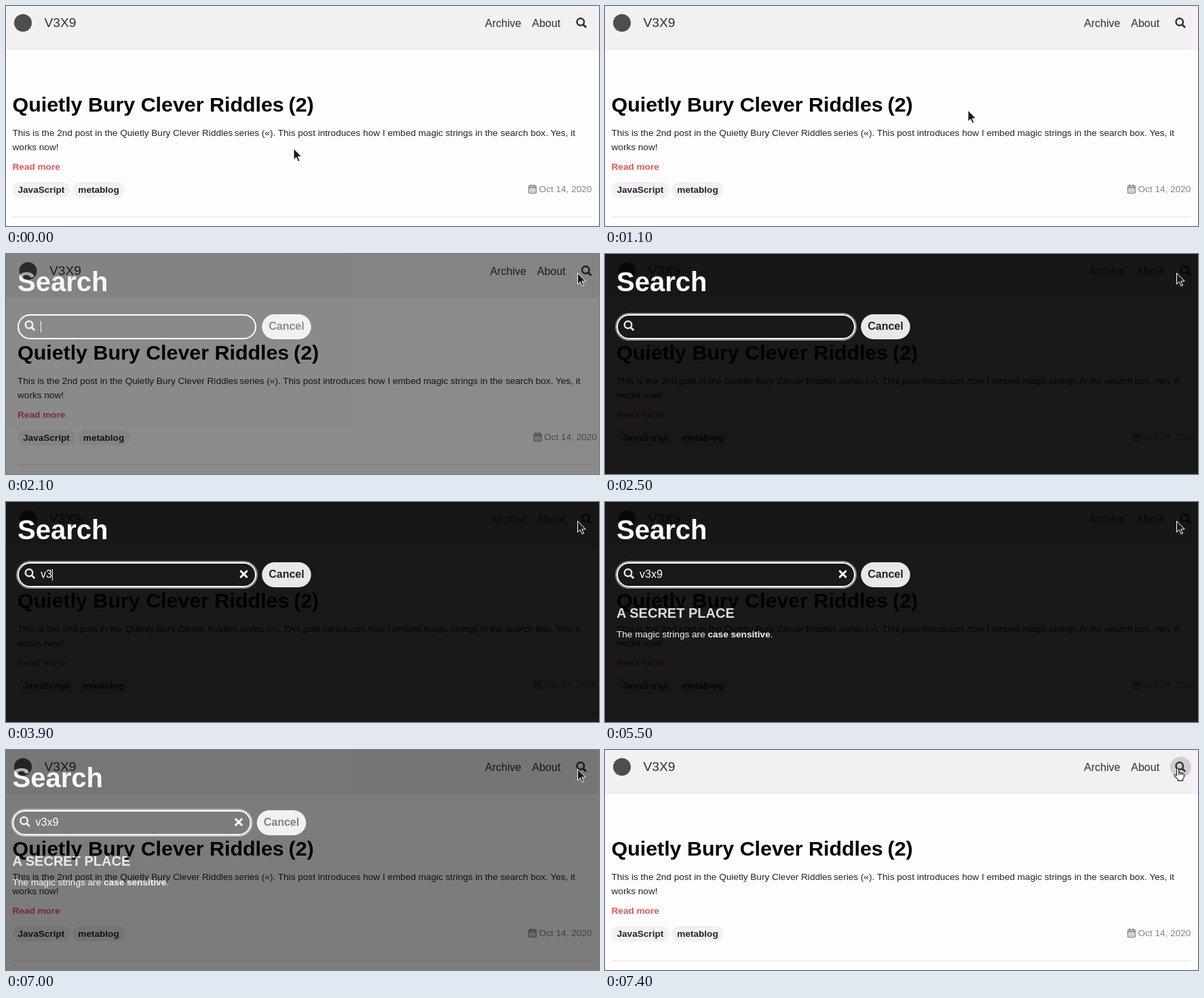
These frames come from a looping animation (874 by 325 pixels, 8.2 s). An HTML page:

```html
<!DOCTYPE html>
<html lang="en">
<head>
<meta charset="utf-8">
<title>Search box</title>
<style>
  html, body { margin: 0; width: 100%; height: 100%; overflow: hidden; background: #fefdfe; }
  svg { display: block; width: 874px; height: 325px; }
  text { font-family: "Liberation Sans", Arial, sans-serif; font-size: 13.6px; fill: #252325; white-space: pre; }
  .nav { font-size: 16px; fill: #323032; }
  .brand { font-size: 19.2px; fill: #323032; }
  .bold { font-weight: bold; }
  .title { font-size: 30.4px; font-weight: bold; fill: #000; }
  .more { font-weight: bold; fill: #ea5357; }
  .date { fill: #868486; }
  .search { font-size: 40px; font-weight: bold; fill: #fff; }
  .field { font-size: 16px; fill: #fff; }
  .cancel { font-size: 16px; font-weight: bold; fill: #222; }
  .secret { font-size: 20px; font-weight: bold; fill: #dedcde; }
  .note { fill: #f4f2f4; }
</style>
</head>
<body>
<svg viewBox="0 0 874 325">
  <defs>
    <g id="lens" fill="none">
      <circle cx="6.5" cy="6.5" r="5.25" stroke-width="2.5"/>
      <path d="M10.4 10.4L14.8 14.8" stroke-width="2.8"/>
    </g>
  </defs>

  <rect width="874" height="325" fill="#fefdfe"/>
  <rect width="874" height="65" fill="#f2f0f2"/>

  <g id="page">
    <circle cx="25" cy="25" r="13" fill="#4f4d4f"/>
    <text class="brand" x="56.5" y="31">V3X9</text>
    <text class="nav" x="706" y="31">Archive</text>
    <text class="nav" x="775.3" y="31">About</text>
    <circle id="hover" cx="848.3" cy="25.3" r="15.4"/>
    <use href="#lens" x="840.3" y="17" stroke="#323032"/>

    <text class="title" x="9.5" y="156">Quietly Bury Clever Riddles</text>
    <text class="title" x="416.6" y="156">(2)</text>
    <text x="9.5" y="192">This is the 2nd post in the Quietly Bury Clever Riddles</text>
    <text x="336.8" y="192">series («). This post introduces how I embed magic strings in the search box. Yes, it</text>
    <text x="9.5" y="213">works now!</text>
    <text class="more" x="9.5" y="242">Read more</text>

    <g fill="#f2f0f2">
      <rect x="9.5" y="260" width="84.8" height="23" rx="11.5"/>
      <rect x="98.3" y="260" width="76.5" height="23" rx="11.5"/>
    </g>
    <text class="bold" x="17.5" y="276">JavaScript</text>
    <text class="bold" x="106.3" y="276">metablog</text>

    <g stroke="#7c7a7c" stroke-width="1.3" fill="none">
      <rect x="770.6" y="265.6" width="10.7" height="10.8" rx="1"/>
      <path d="M770.6 268.4H781.3" stroke-width="1.8"/>
      <path d="M773.5 263.5V267M778.4 263.5V267" stroke-width="1.6"/>
      <path d="M772.6 271.3H779.6M772.6 274H779.6" stroke-dasharray="1.6 1.1"/>
    </g>
    <text class="date" x="785.6" y="275">Oct 14, 2020</text>
    <rect x="9.5" y="311" width="854" height="1" fill="#e3e1e3"/>
  </g>

  <g id="overlay">
    <rect width="874" height="325" fill="#000" fill-opacity=".9"/>
    <g id="panel">
      <text class="search" x="9.5" y="55">Search</text>
      <rect id="ring" x="8.5" y="88" width="354" height="39" rx="19.5" fill="none" stroke="#fff" stroke-opacity=".5" stroke-width="2"/>
      <rect x="10.5" y="90" width="350" height="35" rx="17.5" fill="none" stroke="#fff" stroke-width="2"/>
      <use href="#lens" x="20" y="98" stroke="#e8e6e8"/>
      <text id="query" class="field" x="43.5" y="112"></text>
      <rect id="caret" y="99" width="1" height="17" fill="#fff"/>
      <path id="clear" d="M338.7 102.2L347.3 110.8M347.3 102.2L338.7 110.8" stroke="#fff" stroke-width="3" stroke-linecap="round"/>
      <rect x="369.7" y="89" width="72.5" height="37" rx="18.5" fill="#e9e7e9"/>
      <text class="cancel" x="379.7" y="112">Cancel</text>
      <g id="result">
        <text class="secret" x="9.5" y="171">A SECRET PLACE</text>
        <text class="note" x="9.5" y="200">The magic strings are <tspan class="bold">case sensitive</tspan>.</text>
      </g>
    </g>
  </g>

  <path id="arrow" d="M0 0V16.6L3.8 13.2L6.5 19.3L9.1 18.2L6.4 12.2H11.7Z" fill="#1c1a1c" stroke="#fff" stroke-linejoin="round"/>
  <path id="hand" transform="translate(838 26)" d="M4.6 11.5V2.6Q4.6 1 6.1 1T7.6 2.6V7.4Q9.2 6.6 10.2 7.9Q11.7 7.2 12.7 8.6Q15.4 8.2 15.4 10.6V14.2L13.6 17V19.4H6.4V17.4L1.2 12.4Q.6 10.4 2.6 10.3ZM7.6 7.4V11M10.2 8V11M12.7 8.7V11" fill="#fff" stroke="#1c1a1c" stroke-width="1.1" stroke-linejoin="round"/>
</svg>
<script>
const LOOP = 8200, STEP = 100;
const el = id => document.getElementById(id);
const [page, panel, overlay, hover, ring, query, caret, clear, result, arrow, hand] =
  ["page", "panel", "overlay", "hover", "ring", "query", "caret", "clear", "result", "arrow", "hand"].map(el);

const show = (node, on) => node.setAttribute("visibility", on ? "inherit" : "hidden");
const within = (t, a, b) => t >= a && t < b;

// Value of the last [time, value] pair that has started
const at = (track, t) => track.filter(([start]) => start <= t).pop()[1];

const fade = [[0, 0], [1900, .01], [2000, .2], [2100, .503], [2200, 1],
  [6900, .84], [7000, .565], [7100, .21], [7200, .01], [7300, 0]];
const typed = [[0, ""], [3300, "v"], [3800, "v3"], [4400, "v3x"], [4500, "v3x9"]];
const blink = [[0, true], [2500, false], [3100, true], [5500, false], [5700, true], [6300, false]];
const button = [[0, "none"], [1600, "#dddbdd"], [1700, "#cfcdcf"], [1800, "#bdbbbd"],
  [2000, "none"], [7300, "#dddbdd"], [7400, "#cfcdcf"]];
const pointer = [[0, [424, 210.5]], [1000, [446, 200]], [1100, [535, 154]], [1200, [650, 101]],
  [1300, [752, 57]], [1400, [808, 37]], [1600, [842.5, 28]]];

function draw(now) {
  const t = Math.floor(now % LOOP / STEP) * STEP;

  // Opening the search hides the scrollbar, which recentres the page
  const shift = `translate(${within(t, 1900, 6800) ? 7.5 : 0} 0)`;
  page.setAttribute("transform", shift);
  panel.setAttribute("transform", shift);

  const alpha = at(fade, t);
  overlay.setAttribute("opacity", alpha);
  show(overlay, alpha > 0);
  hover.setAttribute("fill", at(button, t));

  query.textContent = at(typed, t);
  caret.setAttribute("x", 43.5 + query.getComputedTextLength());
  show(caret, at(blink, t));
  show(clear, t >= 3300);
  show(ring, t >= 2200);
  show(result, t >= 4800);

  const pointing = within(t, 1600, 1900) || t >= 7300;
  arrow.setAttribute("transform", `translate(${at(pointer, t)})`);
  show(arrow, !pointing);
  show(hand, pointing);
}

let begin;
function tick(now) {
  begin ??= now;
  draw(Math.max(0, now - begin));
  requestAnimationFrame(tick);
}
draw(0);
requestAnimationFrame(tick);
</script>
</body>
</html>
```
